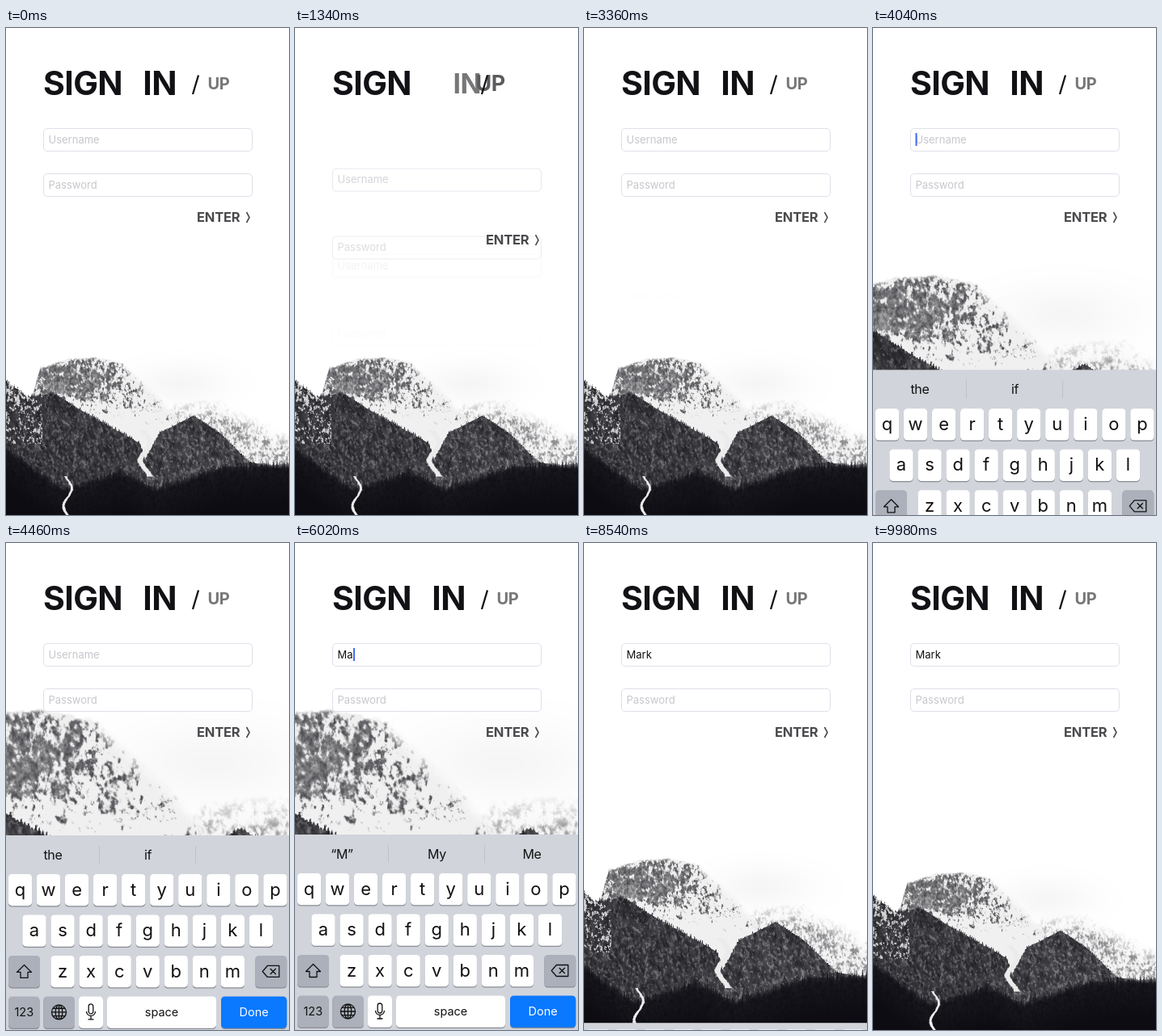
Recreate the animation shown at these times as an HTML page with a canvas. Size 350 px wide and 603 px high, loop 10000 ms.

```html
<!DOCTYPE html>
<html lang="en">
<head>
<meta charset="utf-8">
<title>Sign in</title>
<style>
html, body { margin: 0; width: 100%; height: 100%; overflow: hidden; background: #fff; }
canvas { display: block; width: 350px; height: 603px; }
</style>
</head>
<body>
<canvas id="stage"></canvas>
<script>
(() => {
const W = 350, H = 603, LOOP = 10000;
const FONT = 'Inter, "Open Sans", sans-serif';
const canvas = document.getElementById('stage');
const ctx = canvas.getContext('2d');
const dpr = window.devicePixelRatio || 1;
canvas.width = W * dpr;
canvas.height = H * dpr;

const clamp = v => Math.max(0, Math.min(1, v));
const lerp = (a, b, k) => a + (b - a) * k;
const smooth = (a, b, v) => { const k = clamp((v - a) / (b - a)); return k * k * (3 - 2 * k); };
const inOut = k => { k = clamp(k); return k < .5 ? 2 * k * k : 1 - 2 * (1 - k) * (1 - k); };
const spring = x => x <= 0 ? 0 : 1 - (1 + x) * Math.exp(-x);
const gray = v => `rgb(${v | 0},${v | 0},${v + 2 | 0})`;

// ---------- mountains ----------
function hash(x, y) {
  let h = Math.imul(x, 374761393) + Math.imul(y, 668265263) | 0;
  h = Math.imul(h ^ (h >>> 13), 1274126177);
  return ((h ^ (h >>> 16)) >>> 0) / 4294967296;
}
function noise(x, y) {
  const i = Math.floor(x), j = Math.floor(y), u = smooth(0, 1, x - i), v = smooth(0, 1, y - j);
  return lerp(lerp(hash(i, j), hash(i + 1, j), u), lerp(hash(i, j + 1), hash(i + 1, j + 1), u), v);
}
const fbm = (x, y) => noise(x, y) * .5 + noise(x * 2.1 + 9, y * 2.1) * .3 + noise(x * 4.3, y * 4.3 + 5) * .2;
const blob = (x, y, cx, cy, rx, ry) => Math.exp(-(((x - cx) / rx) ** 2) - ((y - cy) / ry) ** 2);

const FAR = [[190, 486], [208, 461], [265, 460], [350, 503]];
const PEAK = [[30, 462], [42, 420], [78, 409], [110, 407], [145, 414], [186, 451], [222, 492]];
const LEFT = [[0, 437], [26, 457], [58, 452], [95, 475], [165, 514], [180, 560]];
const RIGHT = [[166, 545], [190, 501], [232, 480], [265, 502], [300, 537], [350, 548]];
const WOODS = [[0, 520], [70, 572], [140, 550], [185, 570], [270, 544], [350, 540]];

function crest(ridge, x) {
  const i = ridge.findIndex(p => p[0] > x);
  if (i < 1) return 999;
  const [a, b] = [ridge[i - 1], ridge[i]];
  return lerp(a[1], b[1], (x - a[0]) / (b[0] - a[0]));
}
function trees(x, size) {
  const k = x / 2.2, i = Math.floor(k);
  return size * hash(i, 77) * (1 - Math.abs(k - i - .5) * 2);
}
// winding snow gully: 1 inside, 0 outside
function gully(x, y, cx, y0, y1, bend, width) {
  if (y < y0 || y > y1) return 0;
  const mid = cx + bend * Math.sin((y - y0 - 4) / 7);
  return 1 - smooth(width * .6, width, Math.abs(x - mid));
}
function tone(x, y) {
  let v = 255 - 9 * blob(x, y, 215, 440, 55, 24);
  const fine = fbm(x * .42 + y * .1, y * .3 - x * .2);
  const wide = fbm(x * .1 + y * .05, y * .1 - x * .03);
  const slope = fbm(x * .3 - y * .12, y * .1 + x * .08);

  let d = y - crest(FAR, x) + (wide - .5) * 6;
  if (d > 0) {
    const c = 243 - 125 * smooth(.44, .7, fine * .6 + wide * .4);
    v = lerp(v, c, clamp(d / 24) * .85);
  }
  d = y - crest(PEAK, x) + (fine - .5) * 6;
  if (d > 0) {
    const low = clamp((y - 444 - .28 * (x - 60)) / 22);
    const lift = .16 * clamp((x - 108) / 60) + .22 * low - .17 * blob(x, y, 62, 437, 34, 19)
      - .09 * blob(x, y, 118, 432, 22, 17);
    const snow = smooth(.46, .61, fine * .6 + wide * .4 + lift);
    v = lerp(v, lerp(45 + 160 * fine, 240, snow), clamp(d / (x > 145 ? 12 : 2)));
  }
  d = y - crest(LEFT, x) + trees(x, 5);
  if (d > 0) {
    const patch = smooth(.56, .63, fine + .14 * blob(x, y, 8, 452, 24, 13) - .03);
    v = lerp(22 + 75 * slope * (.4 + fine), 225, patch * (x < 45 && y < 515 ? .9 : .2));
  }
  d = y - crest(RIGHT, x) + trees(x + 31, 3);
  if (d > 0) v = lerp(24 + 85 * slope * (.4 + fine), 185, .35 * smooth(.57, .7, fine));
  d = y - crest(WOODS, x) + trees(x + 60, 8);
  if (d > 0) v = lerp(v, 12 + 22 * fine * (1 - clamp(d / 50)), clamp(.55 + d / 14));

  const snow = gully(x, y, 172, 498, 555, 6, 2 + 5 * fine) + gully(x, y, 76, 555, H, 5, 1 + 2 * fine);
  return lerp(v, 235, clamp(snow));
}
function paintMountains() {
  const c = document.createElement('canvas'), y0 = 380, k = 2;
  c.width = W * k;
  c.height = (H - y0) * k;
  const g = c.getContext('2d'), img = g.createImageData(c.width, c.height);
  for (let j = 0, p = 0; j < c.height; j++)
    for (let i = 0; i < c.width; i++, p += 4) {
      const v = tone(i / k, y0 + j / k);
      img.data[p] = img.data[p + 1] = v;
      img.data[p + 2] = v + 6 * (1 - v / 255);
      img.data[p + 3] = 255;
    }
  g.putImageData(img, 0, 0);
  return c;
}
const mountains = paintMountains();

function drawMountains(p) {
  const s = 1 + 1.03 * p;
  ctx.drawImage(mountains, 175 - 175 * s, H - 223 * s, W * s, 223 * s);
}

// ---------- helpers ----------
function text(str, x, y, size, color, weight = 400, align = 'left', space = 0) {
  ctx.font = `${weight} ${size}px ${FONT}`;
  ctx.letterSpacing = space + 'px';
  ctx.textAlign = align;
  ctx.fillStyle = color;
  ctx.fillText(str, x, y);
}
function box(x, y, w, h, r) {
  ctx.beginPath();
  ctx.roundRect(x, y, w, h, r);
}
function line(color, width, ...pts) {
  ctx.beginPath();
  for (let i = 0; i < pts.length; i += 2) ctx.lineTo(pts[i], pts[i + 1]);
  ctx.strokeStyle = color;
  ctx.lineWidth = width;
  ctx.stroke();
}

// ---------- title and form ----------
const SWAP = 840, TO_UP = 1000, TO_IN = 2540;
const HINTS = ['Username', 'Password', 'Confirm password'];

// p: 0 = large on the left, 1 = small on the right
function word(str, p, leaving, bigX, smallX) {
  const shade = lerp(17, 119, leaving ? clamp(p * 5) : p ** .8);
  text(str, lerp(bigX, smallX, p), lerp(83, 75.5, p), lerp(41, 20, p), gray(shade), 700, 'center', lerp(-.6, -.3, p));
}
function drawTitle(t) {
  const toUp = t < TO_IN;
  const up = toUp ? inOut((t - TO_UP) / SWAP) : 1 - inOut((t - TO_IN) / SWAP);
  text('SIGN', 46, 83, 41, '#111116', 700, 'left', -.6);
  word('IN', up, toUp, 190, 259);
  word('UP', 1 - up, !toUp, 198, 263);
  line('#111116', 2.3, 231, 82, 238, 58.5);
}
function field(y, hint, off, value = '', caret = false) {
  const alpha = clamp(1 - off / 200);
  if (alpha <= 0) return;
  ctx.globalAlpha = alpha;
  y += off;
  box(46.5, y + .5, 258, 28, 4.5);
  ctx.fillStyle = '#fff';
  ctx.fill();
  ctx.strokeStyle = '#e0e0ea';
  ctx.lineWidth = 1;
  ctx.stroke();
  text(value || hint, 52.5, y + 18.7, 13, value ? '#111' : '#c7c7cd');
  if (caret) {
    const x = 52.5 + (value ? ctx.measureText(value).width + .5 : 0);
    ctx.fillStyle = '#426bf2';
    ctx.fillRect(x, y + 6, 2, 16);
  }
  ctx.globalAlpha = 1;
}
function form(count, dt, arriving, value, caret) {
  for (let i = count - 1; i >= 0; i--) {
    const k = arriving ? 1 - inOut((dt - 165 - 70 * i) / 530) : inOut((dt - 68 * (count - 1 - i)) / 775);
    field(124 + 56 * i, HINTS[i], 200 * k, i ? '' : value, !i && caret);
  }
}
function drawForm(t, value, caret) {
  const toUp = t < TO_IN, dt = t - (toUp ? TO_UP : TO_IN);
  form(toUp ? 3 : 2, dt, true, toUp ? '' : value, caret);
  form(toUp ? 2 : 3, dt, false);
  const y = 56 * (toUp ? inOut(dt / 680) : 1 - inOut(dt / 830));
  text('ENTER', 236, y + 239.8, 16.5, '#4a4a4d', 700, 'left', -.2);
  line('#4a4a4d', 1.6, 297.5, y + 228, 301, y + 234.5, 297.5, y + 241);
}

// ---------- keyboard ----------
const NAME = 'Mark', OPEN = 3820, CLOSE = 8200;
const typedAt = i => 5400 + 570 * i;
const typedBy = t => Math.max(0, Math.min(NAME.length, Math.floor((t - 5400) / 570) + 1));
const ROWS = ['qwertyuiop', 'asdfghjkl', 'zxcvbnm'];
const INK = '#111', DARK = '#abb0bb';

function key(x, y, w, color = '#fff', label = '', size = 14.5, ink = INK) {
  box(x, y + 1, w, 39.5, 4.5);
  ctx.fillStyle = '#898c93';
  ctx.fill();
  box(x, y, w, 39.2, 4.5);
  ctx.fillStyle = color;
  ctx.fill();
  text(label, x + w / 2, y + 19.2 + size * .34, size, ink, 400, 'center');
}
function icon(x, y, draw) {
  ctx.save();
  ctx.translate(x, y);
  ctx.lineWidth = 1.3;
  ctx.lineJoin = 'round';
  ctx.strokeStyle = INK;
  ctx.beginPath();
  draw();
  ctx.stroke();
  ctx.restore();
}
function drawIcons() {
  icon(22.5, 529.5, () => {
    for (const [x, y] of [[0, -8], [9, 1], [4.5, 1], [4.5, 8], [-4.5, 8], [-4.5, 1], [-9, 1]]) ctx.lineTo(x, y);
    ctx.closePath();
  });
  icon(327.8, 529.5, () => {
    for (const [x, y] of [[-10.5, 0], [-4.5, -7], [10, -7], [10, 7], [-4.5, 7]]) ctx.lineTo(x, y);
    ctx.closePath();
    for (const s of [-1, 1]) {
      ctx.moveTo(-1, -3.5 * s);
      ctx.lineTo(6, 3.5 * s);
    }
  });
  icon(65.5, 580, () => {
    for (const r of [9, 4.3, 0]) {
      ctx.moveTo(r, 0);
      ctx.ellipse(0, 0, r, 9, 0, 0, 7);
    }
    for (const y of [-4.7, 0, 4.7]) {
      const half = Math.sqrt(81 - y * y);
      ctx.moveTo(-half, y);
      ctx.lineTo(half, y);
    }
  });
  icon(105, 579, () => {
    ctx.roundRect(-2.8, -9, 5.6, 12, 2.8);
    ctx.moveTo(5.5, 0);
    ctx.arc(0, 0, 5.5, 0, Math.PI);
    ctx.moveTo(0, 5.5);
    ctx.lineTo(0, 10);
    ctx.moveTo(-3.5, 10);
    ctx.lineTo(3.5, 10);
  });
}
function suggestions(t) {
  const n = typedBy(t - 80);
  if (!n) return ['the', 'if', ''];
  return [`“${NAME.slice(0, n)}”`, ...(n < 2 ? ['My', 'Me'] : ['May', 'Make'])];
}
function drawKeyboard(t) {
  const closing = t >= CLOSE;
  const off = 242 * (closing ? spring((t - CLOSE) * .00875) : 1 - spring((t - OPEN) * .012));
  if (off > 241) return;
  ctx.save();
  ctx.translate(0, off);
  const y0 = closing ? 401 : 361;
  ctx.fillStyle = '#d1d4db';
  ctx.fillRect(0, y0, W, H - y0);
  if (!closing) {
    suggestions(t).forEach((s, i) => text(s, 58 + 117.5 * i, 391, 16, INK, 400, 'center', -.3));
    for (const x of [115.5, 234.5]) line('#bfc2c9', 1, x, 374, x, 396);
  }
  ROWS.forEach((row, r) => [...row].forEach((c, i) =>
    key(175.2 + 35.05 * (i - row.length / 2) + 2.9, 409 + 50.5 * r, 29.3, '#fff', c, 22)));
  key(3, 510, 39, DARK);
  key(308.3, 510, 39, DARK);
  key(3, 560.5, 38.5, DARK, '123');
  key(46.3, 560.5, 38.7, DARK);
  key(90, 560.5, 30);
  key(125, 560.5, 135, '#fff', 'space');
  key(266, 560.5, 81.3, '#0a78ff', 'Done', 14.5, '#fff');
  drawIcons();
  ctx.restore();
}

// ---------- frame ----------
function draw(t) {
  ctx.setTransform(dpr, 0, 0, dpr, 0, 0);
  ctx.fillStyle = '#fff';
  ctx.fillRect(0, 0, W, H);
  drawMountains(inOut((t - OPEN) / 440) - inOut((t - CLOSE + 8) / 440));
  const count = typedBy(t);
  const last = count ? typedAt(count - 1) : OPEN;
  const caret = t >= OPEN && t < CLOSE && (t - last) % 1000 < 600;
  drawForm(t, NAME.slice(0, count), caret);
  drawTitle(t);
  drawKeyboard(t);
}
const start = performance.now();
function tick() {
  draw((performance.now() - start) % LOOP);
  requestAnimationFrame(tick);
}
tick();
})();
</script>
</body>
</html>
```
